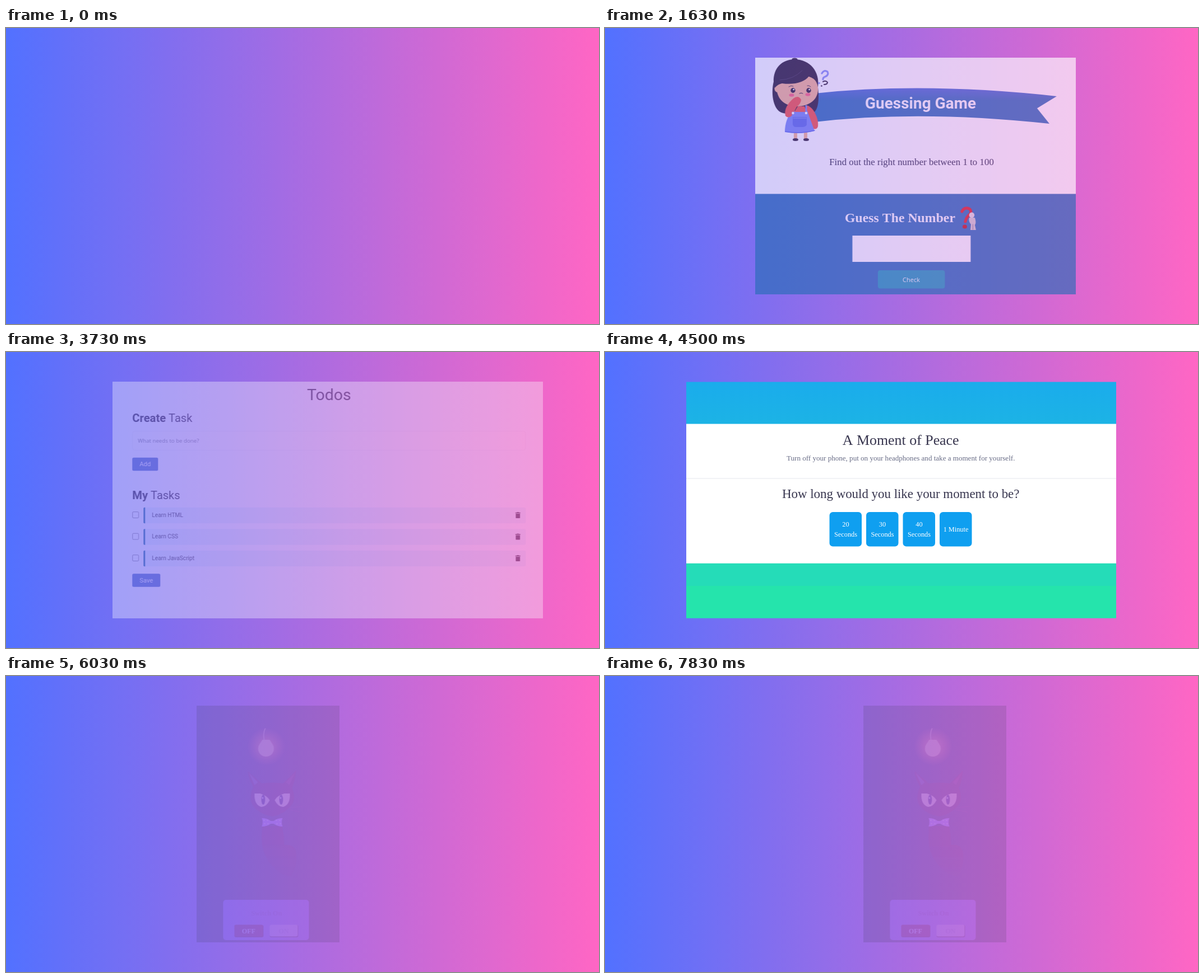
These frames come from a looping animation (1058x529 px, 8 s). An HTML page with a canvas:

```html
<!DOCTYPE html>
<html lang="en">
<head>
<meta charset="utf-8">
<title>Project showcase</title>
<style>
  html, body { margin: 0; width: 100%; height: 100%; overflow: hidden; }
  canvas { display: block; width: 1058px; height: 529px; }
</style>
</head>
<body>
<canvas id="stage" width="1058" height="529"></canvas>
<script>
const W = 1058, H = 529, TOP = 53, PANEL_H = 423;
const SERIF = '"Liberation Serif", "Times New Roman", serif';
const ROBOTO = 'Roboto, sans-serif';
const OPEN = '"Open Sans", sans-serif';

const stage = document.getElementById('stage').getContext('2d');
let g; // context of the panel being painted

function rect(x, y, w, h, fill, r = 0) {
  g.fillStyle = fill;
  g.beginPath();
  g.roundRect(x, y, w, h, r);
  g.fill();
}

function frame(x, y, w, h, color, r = 0) {
  g.strokeStyle = color;
  g.lineWidth = 1;
  g.beginPath();
  g.roundRect(x, y, w, h, r);
  g.stroke();
}

function oval(x, y, rx, ry, fill, turn = 0) {
  g.fillStyle = fill;
  g.beginPath();
  g.ellipse(x, y, rx, ry, turn, 0, 7);
  g.fill();
}

function shape(d, fill) {
  g.fillStyle = fill;
  g.fill(new Path2D(d));
}

function line(d, color, width = 1) {
  g.strokeStyle = color;
  g.lineWidth = width;
  g.lineCap = 'round';
  g.stroke(new Path2D(d));
}

function text(str, x, y, font, fill, align = 'left') {
  g.font = font;
  g.fillStyle = fill;
  g.textAlign = align;
  g.fillText(str, x, y);
}

function fade(y0, y1, a, b) {
  const f = g.createLinearGradient(0, y0, 0, y1);
  f.addColorStop(0, a);
  f.addColorStop(1, b);
  return f;
}

function girl() {
  const hair = '#26192e', skin = '#f8b48c', red = '#f6503f', dress = '#7486f4', deep = '#5668e6';
  // hair behind the face
  shape('M338 56C316 56 300 72 301 96C297 112 298 138 311 149C318 154 330 154 341 152L374 150C382 142 382 122 380 106C384 78 366 56 338 56Z', hair);
  oval(338.5, 56, 5, 2.5, hair);
  // legs and shoes
  rect(337, 186, 6, 13, skin);
  rect(355, 186, 6, 13, skin);
  oval(340, 199.5, 5, 2.5, hair);
  oval(359, 199.5, 5, 2.5, hair);
  // sleeves and dress
  shape('M358 138C370 138 382 160 380 176Q378 182 372 180L360 160Z', red);
  shape('M334 148H361L374 184Q348 191 321 186Q321 164 334 148Z', dress);
  line('M322 185Q348 190 374 183', deep, 1.5);
  shape('M335 159H360V173Q358 177 352 177H341Q336 177 335 172Z', deep);
  line('M336 161H359', '#8c9af6');
  // face
  oval(308, 108, 5.5, 7, skin);
  shape('M306 106C306 90 320 86 344 86Q377 82 380 106C382 128 364 140 343 140C321 140 307 128 306 106Z', skin);
  shape('M303 107C302 74 322 60 343 60C366 60 379 78 380 103Q376 88 364 86C356 97 338 102 316 99Q309 100 303 107Z', hair);
  line('M312 93Q336 92 352 76', '#4a3c58', .8);
  for (const x of [335.5, 363.5]) {
    oval(x, 111.5, 4.2, 4.4, '#24182c');
    oval(x + 1.2, 110, 1.3, 1.4, '#fff');
  }
  line('M328 105Q332 102 336 104M361 103Q364 102 367 105', hair, .9);
  oval(333, 120, 4.5, 2.8, '#ff5e76');
  oval(362, 119, 4.5, 2.8, '#ff5e76');
  line('M347 117Q350 115 353 117', hair);
  // raised arm
  shape('M322 157C319 145 327 134 336 126Q345 119 350 128Q350 135 342 141Q337 151 333 157Q327 162 322 157Z', red);
  shape('M344 140H356L360 150H338Z', red);
  line('M359 139V152M335 151V154', dress, 3);
  oval(335.5, 152, 2.2, 2.2, '#fff');
  oval(359, 152, 2.2, 2.2, '#fff');
  // thoughts
  line('M387 81Q391 74 397 78Q400 84 393 87Q389 88 389 92', '#8490f5', 3.2);
  oval(382, 98.5, 1.8, 1.8, '#8490f5');
  line('M389 96Q394 93 397 97Q397 101 391 101', hair, 2);
  oval(386.5, 103.5, 1.3, 1.3, hair);
}

function guessing() {
  const blue = '#286cb6';
  rect(268, TOP, 572, 244, '#fff');
  rect(268, 296.5, 572, 180, blue);
  shape('M374 117Q570 96 806 122L771 143.5L793 171Q560 146 374 168Z', fade(106, 130, '#486ad4', blue));
  girl();
  text('Guessing Game', 563, 144, `bold 28px ${ROBOTO}`, '#fff', 'center');
  text('Find out the right number between 1 to 100', 547, 245, `16.9px ${SERIF}`, '#262644', 'center');
  text('Guess The Number', 526.5, 347, `bold 23.8px ${SERIF}`, '#fff', 'center');
  line('M637 328Q640 321 647 322Q655 324 652 332Q645 337 643 346', '#e01c1c', 5);
  oval(642, 355, 4, 3.6, '#c01414');
  oval(654.5, 334.5, 4.8, 5, '#e6dcdc');
  shape('M650 339H660Q663 348 660 352L662 361H652L653 351Q648 345 650 339Z', '#d6cccc');
  line('M656.5 351V360', '#8f7f90');
  rect(441.5, 371, 211, 47, '#fff');
  rect(487, 433, 119.5, 32.5, '#1b98b8', 4);
  text('Check', 546.5, 453.5, `11px ${OPEN}`, '#fff', 'center');
}

function heading(strong, rest, y) {
  text(strong, 180, y, `bold 20.2px ${ROBOTO}`, '#231f2d');
  const x = 185 + g.measureText(strong).width;
  text(rest, x, y, `20px ${ROBOTO}`, '#231f2d');
}

function button(label, y, w) {
  rect(180, y, w, 23.5, '#456bc0', 2.5);
  text(label, 180 + w / 2, y + 15.6, `11.3px ${ROBOTO}`, '#fff', 'center');
}

function task(label, y) {
  frame(180.5, y + 8, 10.8, 10.8, '#8c8c96', 1.5);
  rect(200, y, 682, 28.5, '#e3f4fd', 3);
  rect(200, y, 3, 28.5, '#146c98', [2, 0, 0, 2]);
  text(label, 215, y + 16.8, `10.2px ${ROBOTO}`, '#30333f');
  rect(863.5, y + 9, 9, 1.6, '#1c1a26', .5);
  rect(866.2, y + 8.2, 3.6, 1.2, '#1c1a26', .5);
  rect(864.2, y + 11.2, 7.6, 8.2, '#1c1a26', [0, 0, 1.2, 1.2]);
}

function todos() {
  rect(145, TOP, 768, PANEL_H, '#fafbfe');
  text('Todos', 531, 86, `28.4px ${ROBOTO}`, '#231f2d', 'center');
  heading('Create', 'Task', 124.5);
  rect(180, 141, 702, 35, '#fcfcfd', 4);
  frame(180.5, 141.5, 701, 34, '#eef0f5', 4);
  text('What needs to be done?', 190, 162, `9.7px ${OPEN}`, '#7b7d87');
  button('Add', 188.7, 46);
  heading('My', 'Tasks', 263);
  ['Learn HTML', 'Learn CSS', 'Learn JavaScript'].forEach((t, i) => task(t, 277.7 + i * 38.5));
  button('Save', 396.2, 50);
}

function peace() {
  rect(145, TOP + .5, 767, 76, fade(53, 128, '#1aacec', '#1cb3e5'));
  rect(145, 128.5, 767, 249.5, '#fff');
  rect(145, 225.5, 767, 1, '#e6e8ee');
  rect(145, 377.7, 767, 41, '#25dcb8');
  rect(145, 418, 767, 57.7, '#25e4ac');
  const ink = '#38364f', mid = 527.7;
  text('A Moment of Peace', mid, 166, `25.9px ${SERIF}`, ink, 'center');
  text('Turn off your phone, put on your headphones and take a moment for yourself.',
    mid, 194.3, `13.07px ${SERIF}`, '#676b85', 'center');
  text('How long would you like your moment to be?', mid, 260.5, `22.9px ${SERIF}`, ink, 'center');
  [['20', 'Seconds'], ['30', 'Seconds'], ['40', 'Seconds'], ['1 Minute']].forEach((rows, i) => {
    const x = 400.5 + i * 65.5;
    rect(x, 286, 57.5, 61.5, '#0f9ff0', 6);
    rows.forEach((row, k) => text(row, x + 29, (rows.length > 1 ? 312 : 321) + k * 18,
      `12.3px ${SERIF}`, '#fff', 'center'));
  });
}

function cat() {
  const fur = '#4a2422';
  rect(340, TOP, 255, PANEL_H, '#30363c');
  // lamp
  const glow = g.createRadialGradient(464, 126, 10, 464, 126, 34);
  glow.addColorStop(0, 'rgba(255,150,70,.75)');
  glow.addColorStop(1, 'rgba(255,120,60,0)');
  oval(464, 126, 34, 34, glow);
  line('M462 94Q458 102 460 114', '#f0d8a0', 1.4);
  shape('M457 114H470L475 122H452Z', '#ffdc88');
  oval(463.5, 130, 14, 14, '#ffdc88');
  // body and tail
  shape('M457 268H492Q496 282 496 302Q513 300 517 314Q520 342 508 358Q484 356 466 328Q452 306 457 268Z',
    fade(300, 358, fur, '#343438'));
  // head
  shape('M431 170L456 192Q475 189 494 192L517 169Q516 186 510 200Q516 216 512 226Q500 246 475 251Q446 246 437 226Q433 212 441 198Q432 184 431 170Z', fur);
  shape('M433 173L449 190L443 195Z', '#5c4c60');
  shape('M515 173L499 190L505 195Z', '#6c3038');
  shape('M443 210H453Q466 214 470 222Q464 234 455 234Q442 230 443 210Z', '#fff0b0');
  shape('M506 210H496Q483 214 479 222Q485 234 494 234Q507 230 506 210Z', '#fff0b0');
  oval(458.5, 221, 3.4, 9, '#20183a');
  oval(490.5, 221, 3.4, 9, '#20183a');
  oval(457.5, 218, 1.2, 1.8, '#fff');
  oval(489.5, 218, 1.2, 1.8, '#fff');
  line('M505 236L528 233M505 239L524 243', '#5c3840', .8);
  // bow tie
  shape('M456 254Q465 254 472 259H477Q484 254 493 254Q490 261 493 269Q484 269 477 264H472Q465 269 456 269Q459 261 456 254Z', '#a890ff');
  for (const x of [460, 466, 482, 488]) {
    oval(x, 258, 1.2, 1.2, '#e4dcff');
    oval(x + 1, 264, 1.2, 1.2, '#e4dcff');
  }
  // switch
  rect(387, 400, 153, 72, '#7c6cf0', 5);
  text('Switch On', 464.5, 427.5, `bold 12.3px ${SERIF}`, '#6650b4', 'center');
  rect(407, 445, 52, 22, '#481c2c', 3);
  rect(407, 444.5, 51, 21, '#6a1c30', 3);
  text('OFF', 432.5, 459.5, `bold 12px ${SERIF}`, '#d0c4ff', 'center');
  rect(470, 445, 51, 22, '#402c58', 3);
  rect(470, 444.5, 50, 21, '#b4a4f8', 3);
  text('ON', 495, 459.5, `bold 12px ${SERIF}`, '#9084d8', 'center');
}

function panel(draw, x, left, w) {
  const c = document.createElement('canvas');
  c.width = w;
  c.height = PANEL_H;
  g = c.getContext('2d');
  g.translate(-left, -TOP);
  draw();
  return { c, x };
}

const panels = [
  panel(guessing, 243, 268, 572),
  panel(todos, 145, 145, 768),
  panel(peace, 145, 145, 767),
  panel(cat, 401, 340, 255)
];

const back = stage.createLinearGradient(0, 0, W, 0);
back.addColorStop(0, '#5271ff');
back.addColorStop(1, '#ff66c4');

// Quadratic ease in and out, joined partway through its first half.
function reveal(ms) {
  const u = Math.min(1, (ms + 130) / 630);
  return u < .5 ? 2 * u * u : 1 - 2 * (1 - u) ** 2;
}

const SLIDE = 70, STEP = 100 / 3, PER_PANEL = 60;

function render(ms) {
  const tick = Math.floor((ms % 8000 + 4) / STEP) % (PER_PANEL * 4);
  const { c, x } = panels[Math.floor(tick / PER_PANEL)];
  const n = tick % PER_PANEL, t = n * STEP;
  stage.globalAlpha = 1;
  stage.fillStyle = back;
  stage.fillRect(0, 0, W, H);
  if (n < 1 || n > 55) return;
  const leaving = t > 1000;
  const p = reveal(leaving ? 1868 - t : t);
  stage.globalAlpha = p;
  stage.drawImage(c, x + (leaving ? 1 : -1) * SLIDE * (1 - p), TOP);
}

const start = performance.now();
function loop() {
  render(performance.now() - start);
  requestAnimationFrame(loop);
}
loop();
</script>
</body>
</html>
```
